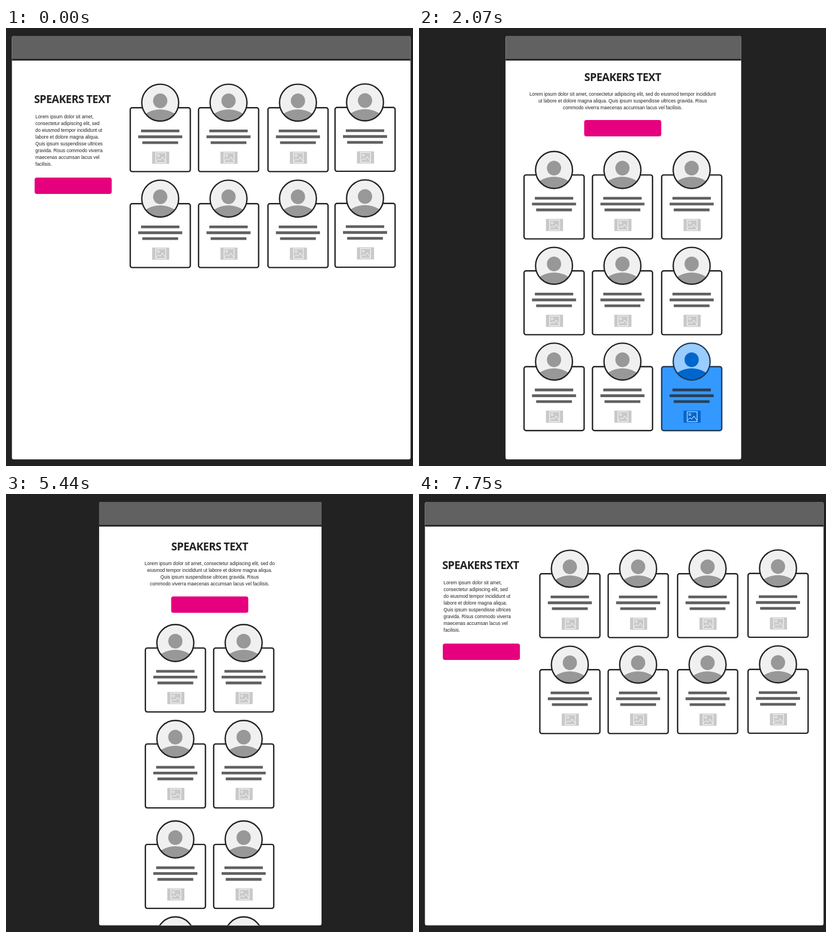
An HTML page that plays this animation: 721x776 px, repeating every 8280 ms.

```html
<!DOCTYPE html>
<html lang="en">
<head>
<meta charset="utf-8">
<title>Responsive speakers layout</title>
<style>
  html, body { margin: 0; width: 100%; height: 100%; overflow: hidden; background: #222; }
  svg { display: block; width: 721px; height: 776px; }
  #title { font-weight: 700; font-stretch: 50%; letter-spacing: -.03em; text-anchor: middle; fill: #222; }
  #copy { font: 8.36px "Liberation Sans", Arial, sans-serif; fill: #222; }
  .card {
    --line: #222; --paper: #fff; --disc: #f0f0f0; --person: #989898;
    --bar: #616161; --pic: #c9c9c9;
  }
  .card.extra {
    --line: #1f3a59; --paper: #39f; --disc: #9cf; --person: #06c;
    --bar: #2b4057; --pic: #06c;
  }
</style>
</head>
<body>
<svg viewBox="0 0 721 776">
  <defs>
    <clipPath id="frame"><rect class="page" y="14" height="750.5" rx="4"/></clipPath>
    <clipPath id="disc"><circle r="32.6"/></clipPath>
    <g id="card">
      <rect x="-53.1" y="8.9" width="106.4" height="113.2" rx="3.5" fill="var(--paper)" stroke="var(--line)" stroke-width="2.4"/>
      <circle r="32.7" fill="var(--disc)"/>
      <g fill="var(--person)">
        <ellipse cy="-3.3" rx="12.6" ry="13"/>
        <ellipse cy="33.5" rx="33" ry="21.5" clip-path="url(#disc)"/>
      </g>
      <circle r="32.7" fill="none" stroke="var(--line)" stroke-width="2.4"/>
      <path d="M-34 50.1H34M-39 60.4H39M-31.7 70.8H31.7" stroke="var(--bar)" stroke-width="4.9"/>
      <rect x="-14.3" y="86.8" width="30.3" height="21.4" fill="var(--pic)"/>
      <g fill="none" stroke="#fff">
        <rect x="-7.9" y="88.8" width="17.6" height="17.4"/>
        <circle cx="-3.3" cy="93.7" r="1.8"/>
        <path d="M-7 103.5L-3 99.3L-.2 102L4 96.5L9 103.5"/>
      </g>
    </g>
  </defs>
  <g clip-path="url(#frame)">
    <rect class="page" y="14" height="750.5" fill="#fff"/>
    <rect class="page" y="14" height="41" fill="#616161"/>
    <rect class="page" y="54.8" height="2.9" fill="#222"/>
    <text id="title">SPEAKERS TEXT</text>
    <text id="copy"></text>
    <rect id="button" width="136.6" height="29" rx="4" fill="#e6007e"/>
    <g id="cards"></g>
  </g>
</svg>
<script>
const $ = id => document.getElementById(id);
const pages = document.querySelectorAll('.page');
const LOOP = 8280, STEP = 30, SHRINK_END = 3750, GROW_START = 3880, GROW_END = 7750;

// Line breaks of the paragraph for each available measure
const words = 'Lorem ipsum dolor sit amet, consectetur adipiscing elit, sed do eiusmod tempor incididunt ut labore et dolore magna aliqua. Quis ipsum suspendisse ultrices gravida. Risus commodo viverra maecenas accumsan lacus vel facilisis.'.split(' ');
const wrap = counts => {
  let at = 0;
  return counts.map(n => words.slice(at, at += n).join(' '));
};
const narrow = wrap([5, 4, 5, 5, 4, 4, 4, 1]);
const medium = wrap([10, 9, 6, 7]);
const wide = wrap([13, 12, 7]);

// Pick the slimmest installed face, then size it to the heading measure
function fitTitle() {
  const el = $('title'), size = 28.5;
  const tryFont = name => {
    el.style.fontFamily = `"${name}", sans-serif`;
    el.style.fontSize = size + 'px';
    return el.getComputedTextLength();
  };
  const best = ['Noto Sans', 'Open Sans', 'Roboto', 'Lato', 'DejaVu Sans']
    .map(name => ({ name, length: tryFont(name) }))
    .sort((a, b) => a.length - b.length)[0];
  tryFont(best.name);
  const fitted = size * Math.min(1, 136 / best.length);
  el.style.fontSize = fitted + 'px';
  return fitted * .357;
}
const titleDrop = fitTitle();

function layout(left, width, growing) {
  const centred = { x: 360.8, titleY: 93.3, copyY: 126, rows: [0, 170, 348, 518] };
  if (width > 560) {
    const shift = left - 10, full = width > 680;
    const first = (growing ? 267 : 273) + shift * .7;
    return {
      x: (growing ? 108.8 : 117.3) + shift, titleY: 125.8, copyY: 160.4, lines: narrow, aside: true,
      buttonY: 265, top: 132.3, rows: full ? [0, 170] : [0, 170, 340],
      cols: [first, first + 121, first + 244], pinned: full
    };
  }
  if (width > 508) return { ...centred, lines: wide, buttonY: 169.4, top: 251.5, rows: [0, 169.8],
    cols: [184.3, 306.5, 428.6, 550.7] };
  if (width > 405) return { ...centred, titleY: 86.9, copyY: 119.5, lines: wide, buttonY: 163, top: 251.5,
    rows: [0, 169.8, 339.6], cols: [239.2, 360.4, 483] };
  if (width > 270) return { ...centred, lines: medium, buttonY: 181.4, top: 264,
    cols: growing ? [300, 421] : [295.3, 416.3] };
  return { ...centred, lines: narrow, buttonY: 227, top: 304.5, cols: [361] };
}

const card = (x, y, extra) =>
  `<use href="#card" class="card${extra ? ' extra' : ''}" transform="translate(${x} ${y})"/>`;

function draw(time) {
  const growing = time >= GROW_START;
  const start = growing ? GROW_START : 0;
  const end = growing ? GROW_END : SHRINK_END;
  const now = Math.min(end, start + Math.floor((time - start) / STEP) * STEP);
  const done = (now - start) / (end - start);
  const inset = growing ? 1 - done : done;
  const left = 10.3 + 258.8 * inset;
  const width = 716.8 - 264.4 * inset - left;
  const l = layout(left, width, growing);

  pages.forEach(p => { p.setAttribute('x', left); p.setAttribute('width', width); });
  $('title').setAttribute('x', l.x);
  $('title').setAttribute('y', l.titleY + titleDrop);
  const copyX = l.aside ? l.x - 65.5 : l.x;
  $('copy').setAttribute('text-anchor', l.aside ? 'start' : 'middle');
  $('copy').innerHTML = l.lines
    .map((s, i) => `<tspan x="${copyX}" y="${l.copyY + i * 12}">${s}</tspan>`).join('');
  $('button').setAttribute('x', l.x + (l.aside ? -66.9 : -68.2));
  $('button').setAttribute('y', l.buttonY);

  let html = '';
  l.rows.forEach((dy, r) => {
    l.cols.forEach((x, c) => {
      html += card(x, l.top + dy, l.cols.length === 3 && r === 2 && c === 2);
    });
    if (l.pinned) html += card(636, l.top + dy - .5);
  });
  $('cards').innerHTML = html;
}

const origin = performance.now();
function tick() {
  draw((performance.now() - origin) % LOOP);
  requestAnimationFrame(tick);
}
tick();
</script>
</body>
</html>
```
